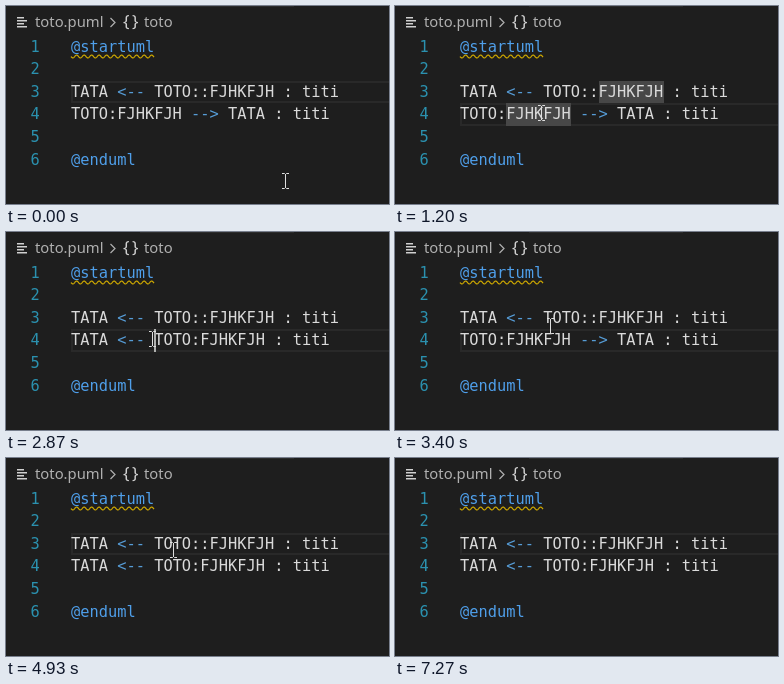
These frames come from a looping animation (383 by 198 pixels, 7.8 s). An HTML page with a canvas:

```html
<!DOCTYPE html>
<html lang="en">
<head>
<meta charset="utf-8">
<title>Editor</title>
<style>
html, body { margin: 0; width: 100%; height: 100%; overflow: hidden; background: #1e1e1e; }
canvas { display: block; }
</style>
</head>
<body>
<canvas id="stage"></canvas>
<script>
const W = 383, H = 198, LOOP = 7800, TICK = 1000 / 15;
const LEFT = 65, CHAR = 9.24;
const MONO = '15.35px "DejaVu Sans Mono", "Noto Sans Mono", monospace';
const SANS = '14.8px "Noto Sans", "Open Sans", sans-serif';
const BRACES = '17px "Noto Sans", "Open Sans", sans-serif';
const TEXT = '#dadada', BLUE = '#569cd6', KEYWORD = '#4f9fea';
const NUMBER = '#2b91af', CRUMB = '#b0b0b0', ICON = '#d0d0d0';

const canvas = document.getElementById('stage');
const dpr = window.devicePixelRatio || 1;
canvas.width = W * dpr;
canvas.height = H * dpr;
canvas.style.width = W + 'px';
canvas.style.height = H + 'px';
const ctx = canvas.getContext('2d', { alpha: false });
ctx.scale(dpr, dpr);

// All times below are in ticks of 1/15 s.
const flips = { 3: [67, 74, 79, 83, 88, 92], 4: [22, 31, 39, 44, 54] };
const uncoloured = { 3: [67, 83, 92], 4: [31, 39, 54] };
const carets = [
  { row: 4, col: 9, on: [[12, 18], [22, 26], [31, 33], [39, 50], [54, 64]] },
  { row: 3, col: 11, on: [[64, 74], [75, 83], [84, 98], [106, 109]] }
];
const marks = [
  { from: 3, to: 11, words: [[3, 9, 4], [4, 0, 4]] },
  { from: 16, to: 22, words: [[3, 15, 7], [4, 5, 7]] },
  { from: 65, to: 67, words: [[3, 9, 4], [4, 9, 4]] }
];
const pointerPath = [
  [0, 279.5, 175], [7, 146.5, 107], [46, 146.5, 107], [50, 150, 100],
  [51, 155.5, 94], [54, 155.5, 94], [61, 167.5, 92], [93, 167.5, 92],
  [97, 200, 159]
];
const POINTER_GONE = 98;

const within = (t, a, b) => t >= a && t < b;
const colX = col => LEFT + col * CHAR;
const rowY = row => Math.floor(75 + (row - 3) * 22.5);
const baseY = row => Math.round(90.8 + (row - 3) * 22.6);

function write(str, x, y, color, font = MONO) {
  ctx.font = font;
  ctx.fillStyle = color;
  ctx.fillText(str, x, y);
}

function line(points, color, width) {
  ctx.beginPath();
  points.forEach(([x, y], i) => i ? ctx.lineTo(x, y) : ctx.moveTo(x, y));
  ctx.strokeStyle = color;
  ctx.lineWidth = width;
  ctx.stroke();
}

function drawBreadcrumb() {
  ctx.fillStyle = '#2d2d2d';
  ctx.fillRect(134, 0, 154, 1);
  ctx.fillStyle = ICON;
  [7, 10, 7, 10].forEach((w, i) => ctx.fillRect(11, 11 + i * 3, w, 1.5));
  write('toto.puml', 29, 21, CRUMB, SANS);
  line([[104.5, 12], [109, 16.5], [104.5, 21]], CRUMB, 1.2);
  write('{', 117, 21, ICON, BRACES);
  write('}', 126, 21, ICON, BRACES);
  write('toto', 138, 21, CRUMB, SANS);
}

function drawSquiggle() {
  const points = [];
  for (let x = LEFT; x <= 148; x += 0.5) {
    points.push([x, 50.5 + 1.5 * Math.sin((x - LEFT) * 2 * Math.PI / 7.5)]);
  }
  line(points, '#cca700', 1.2);
}

function drawCurrentLine(t) {
  const row = within(t, 11, 64) ? 4 : 3;
  const y = rowY(row), h = rowY(row + 1) - y;
  ctx.strokeStyle = '#292929';
  ctx.lineWidth = 2;
  ctx.strokeRect(LEFT + 1, y + 1, W, h - 2);
}

function drawMarks(t) {
  ctx.fillStyle = '#474747';
  for (const { from, to, words } of marks) {
    if (!within(t, from, to)) continue;
    for (const [row, col, len] of words) {
      const y = rowY(row);
      ctx.fillRect(Math.round(colX(col)), y, Math.round(len * CHAR), rowY(row + 1) - y);
    }
  }
}

function drawRelation(row, member, t) {
  const count = flips[row].filter(f => t >= f).length;
  const pointsLeft = (row === 3) === (count % 2 === 0);
  const [a, arrow, b] = pointsLeft ? ['TATA', '<--', member] : [member, '-->', 'TATA'];
  const arrowCol = a.length + 1, y = baseY(row);
  write(a, LEFT, y, TEXT);
  write(arrow, colX(arrowCol), y, uncoloured[row].includes(t) ? TEXT : BLUE);
  write(b + ' : titi', colX(arrowCol + 4), y, TEXT);
}

function drawCarets(t) {
  ctx.fillStyle = '#aeafad';
  for (const { row, col, on } of carets) {
    if (on.some(([a, b]) => within(t, a, b))) {
      const y = rowY(row);
      ctx.fillRect(Math.round(colX(col)), y, 2, rowY(row + 1) - y);
    }
  }
}

function pointerAt(t) {
  const i = pointerPath.findIndex(p => p[0] >= t);
  if (i < 1) return pointerPath[0].slice(1);
  const [t0, x0, y0] = pointerPath[i - 1], [t1, x1, y1] = pointerPath[i];
  const k = (t - t0) / (t1 - t0);
  return [x0 + (x1 - x0) * k, y0 + (y1 - y0) * k];
}

function drawPointer(t) {
  if (t >= POINTER_GONE) return;
  const [px, py] = pointerAt(t);
  const x = Math.floor(px) + 0.5, y = Math.round(py);
  const color = '#dedede';
  line([[x, y - 7], [x, y + 7]], color, 1);
  for (const s of [-1, 1]) {
    line([[x - 3.5, y + 7.5 * s], [x - 1, y + 7.5 * s], [x, y + 6.5 * s],
      [x + 1, y + 7.5 * s], [x + 3.5, y + 7.5 * s]], color, 1);
  }
}

function draw(t) {
  ctx.fillStyle = '#1e1e1e';
  ctx.fillRect(0, 0, W, H);
  drawBreadcrumb();
  drawCurrentLine(t);
  drawMarks(t);
  for (let row = 1; row <= 6; row++) write(String(row), 24.5, baseY(row), NUMBER);
  write('@startuml', LEFT, baseY(1), KEYWORD);
  drawSquiggle();
  drawRelation(3, 'TOTO::FJHKFJH', t);
  drawRelation(4, 'TOTO:FJHKFJH', t);
  write('@enduml', LEFT, baseY(6), KEYWORD);
  drawCarets(t);
  drawPointer(t);
}

const start = performance.now();
function frame() {
  const ms = (performance.now() - start) % LOOP;
  draw(Math.floor((ms + 4) / TICK) % 117);
  requestAnimationFrame(frame);
}
frame();
</script>
</body>
</html>
```
